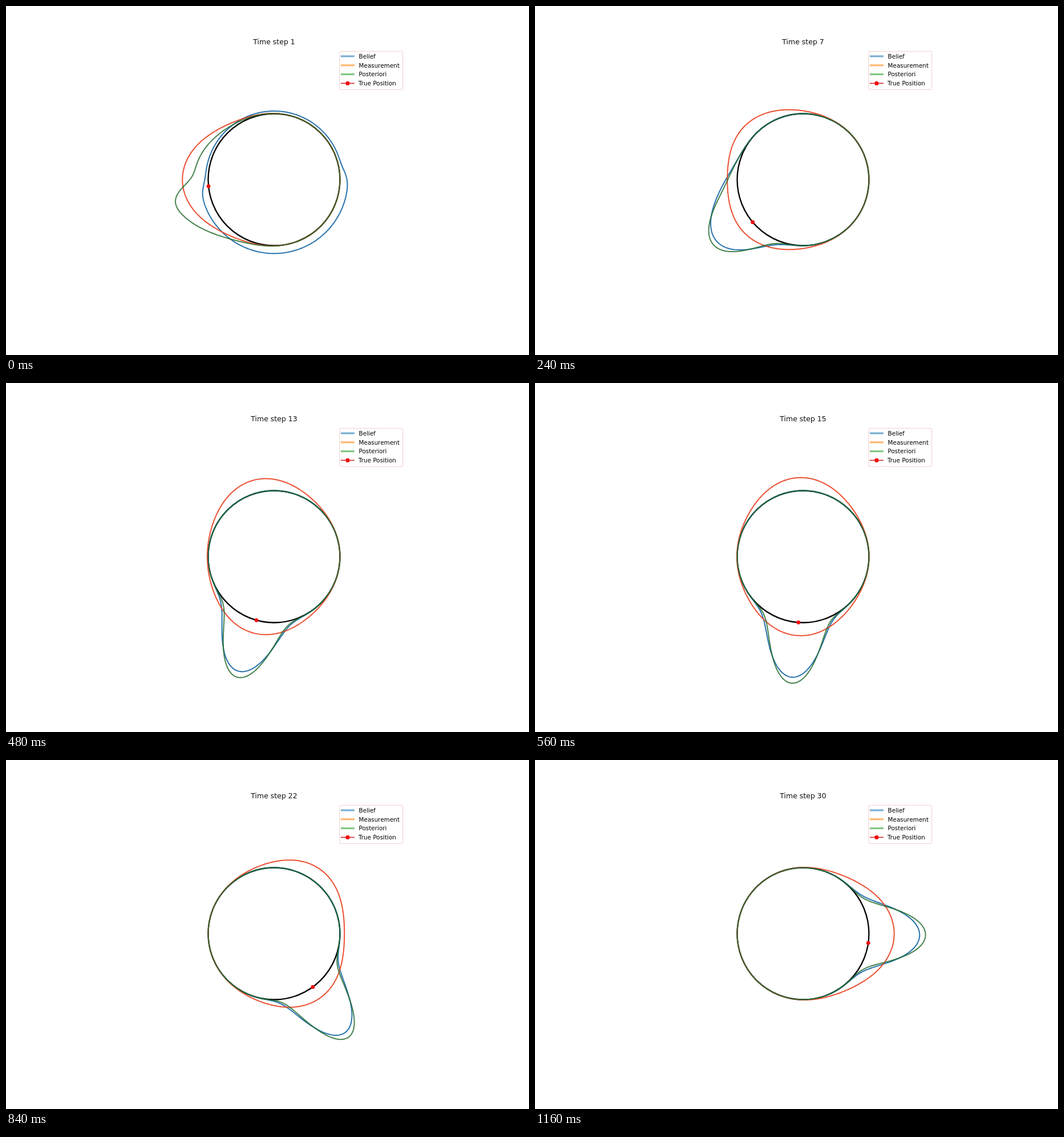
Animation of 917 by 611 pixels, one loop 1200 ms. Source, as an HTML page:

```html
<!DOCTYPE html>
<html lang="en">
<head>
<meta charset="utf-8">
<title>Circular filter</title>
<style>
  html, body { margin: 0; width: 100%; height: 100%; overflow: hidden; background: #fff; }
  svg { display: block; width: 917px; height: 611px; }
  text { font-family: "DejaVu Sans", Verdana, sans-serif; font-size: 10.42px; fill: #000; }
  #title { font-size: 12.5px; fill: #111; text-anchor: middle; }
  .curve { fill: none; stroke-width: 2; stroke-linejoin: round; }
  .key { stroke-width: 3.1; }
</style>
</head>
<body>
<svg viewBox="0 0 917 611">
  <text id="title" x="470" y="67"></text>
  <circle cx="470" cy="304" r="115.5" fill="none" stroke="#000" stroke-width="2.3"/>
  <path id="belief" class="curve" stroke="#1668a6" stroke-opacity=".92"/>
  <path id="measurement" class="curve" stroke="#ea4322" stroke-opacity=".92"/>
  <path id="posterior" class="curve" stroke="#1e6828" stroke-opacity=".82"/>
  <circle id="truth" r="3.4" fill="#f00e0e"/>

  <rect x="585" y="79.3" width="110.7" height="67" rx="2.5" fill="#fff" stroke="#f3cccf"/>
  <path class="key" d="M587 88h24" stroke="#79add2"/>
  <path class="key" d="M587 103.8h24" stroke="#ffb66e"/>
  <path class="key" d="M587 119.6h24" stroke="#80c680"/>
  <path d="M587 135.4h24" stroke="#d62728" stroke-width="1.6"/>
  <circle cx="599" cy="135.4" r="3.6" fill="#f00e0e"/>
  <text x="618.6" y="91.8">Belief</text>
  <text x="618.6" y="107.5">Measurement</text>
  <text x="618.6" y="123.2">Posteriori</text>
  <text x="618" y="139">True Position</text>
</svg>
<script>
const CX = 470, CY = 304, R = 115.5;
const CELLS = 360, STEPS = 30, STEP_MS = 40;
const SPEED = 0.1, MOVE_SD = 0.1, SENSE_SD = 0.5;
const TAU = 2 * Math.PI, CELL = TAU / CELLS;
const angles = Array.from({ length: CELLS }, (_, i) => (i + 0.5) * CELL);
const byId = id => document.getElementById(id);

function wrappedNormal(x, sd) {
  let sum = 0;
  for (let k = -2; k <= 2; k++) sum += Math.exp(-((x + k * TAU) ** 2) / (2 * sd * sd));
  return sum / (sd * Math.sqrt(TAU));
}

const kernel = angles.map((_, i) => wrappedNormal(i * CELL - SPEED, MOVE_SD) * CELL);

function predict(density) {
  return density.map((_, i) => {
    let sum = 0;
    for (let j = 0; j < CELLS; j++) sum += density[j] * kernel[(i - j + CELLS) % CELLS];
    return sum;
  });
}

// Only the horizontal position is sensed, so the likelihood mirrors in the x axis.
function sense(angle) {
  return angles.map(a =>
    (wrappedNormal(a - angle, SENSE_SD) + wrappedNormal(a + angle, SENSE_SD)) / 2);
}

function update(prior, likelihood) {
  const product = prior.map((p, i) => p * likelihood[i]);
  const total = product.reduce((a, b) => a + b) * CELL;
  return product.map(p => p / total);
}

function outline(density) {
  const points = density.map((p, i) => {
    const r = R * (1 + p / 2);
    return (CX + r * Math.cos(angles[i])).toFixed(2) + " " +
           (CY - r * Math.sin(angles[i])).toFixed(2);
  });
  return "M" + points.join("L") + "Z";
}

function simulate() {
  let state = angles.map(a => (a < Math.PI ? 0.5 : 1.5) / TAU);
  return Array.from({ length: STEPS }, (_, i) => {
    const truth = Math.PI + SPEED * (i + 1);
    const belief = predict(state), measurement = sense(truth);
    state = update(belief, measurement);
    return {
      truth,
      belief: outline(belief),
      measurement: outline(measurement),
      posterior: outline(state)
    };
  });
}

const history = simulate();

function render(time) {
  const i = Math.floor(time / STEP_MS) % STEPS;
  const now = history[i];
  byId("title").textContent = "Time step " + (i + 1);
  for (const id of ["belief", "measurement", "posterior"]) byId(id).setAttribute("d", now[id]);
  byId("truth").setAttribute("cx", CX + R * Math.cos(now.truth));
  byId("truth").setAttribute("cy", CY - R * Math.sin(now.truth));
}

const start = performance.now();
function tick() {
  render(performance.now() - start);
  requestAnimationFrame(tick);
}
tick();
</script>
</body>
</html>
```
